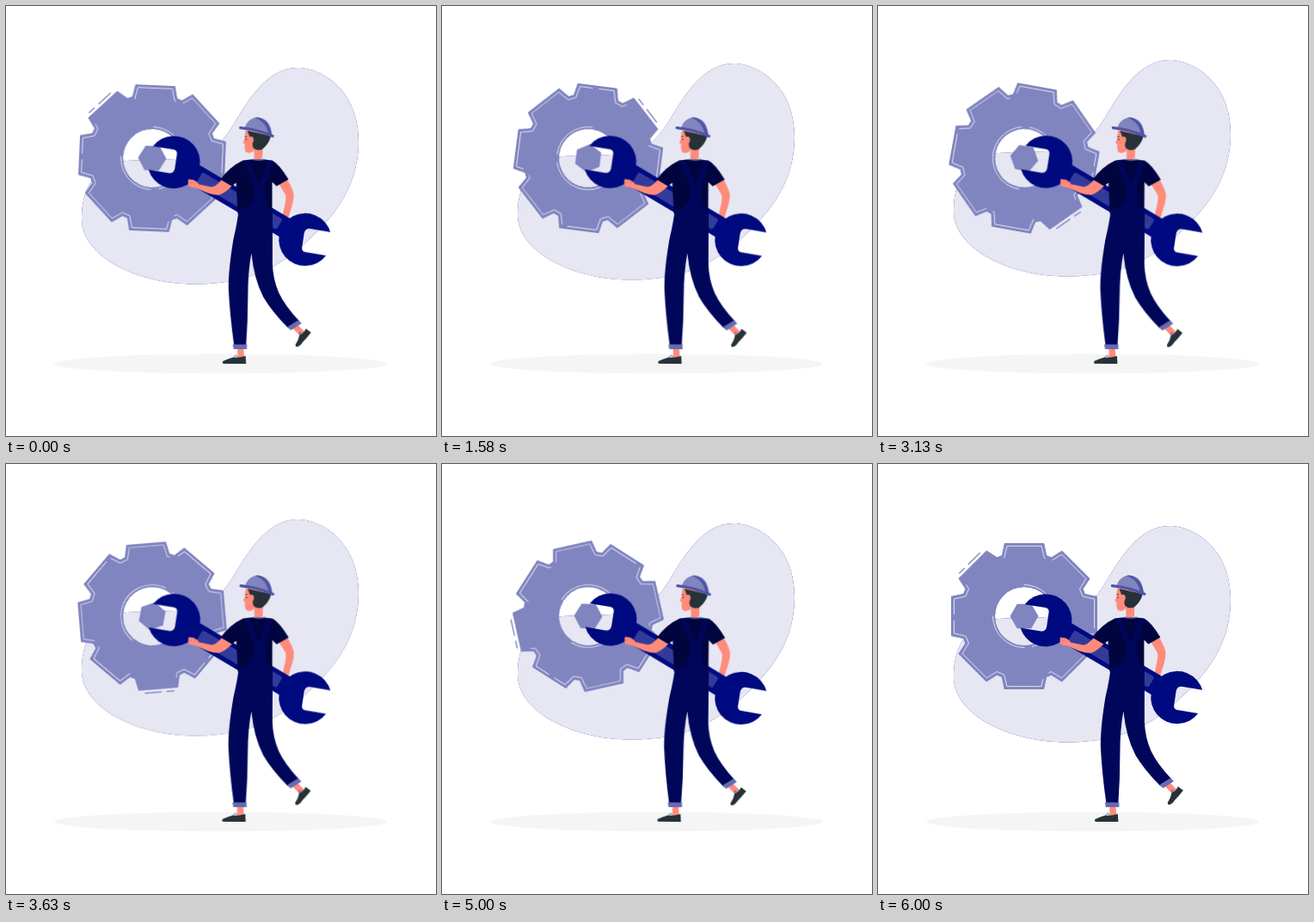
An HTML page that plays this animation: 500x500 px, repeating every 6040 ms.

```html
<!DOCTYPE html>
<html lang="en">
<head>
<meta charset="utf-8">
<title>Mechanic with wrench</title>
<style>
  html, body { margin: 0; width: 100%; height: 100%; overflow: hidden; background: #fff; }
  svg { display: block; width: 100%; height: 100%; }

  .blob, .gear, .worker { animation: 6.04s linear -40ms infinite; }
  .blob { animation-name: float; }
  .gear { animation-name: spin; transform-origin: 170px 177px; }
  .worker { animation-name: sway; animation-duration: 1.51s; transform-origin: 270px 273px; }

  /* One turn takes 6 s, then rests for 40 ms. */
  @keyframes spin { 99.34%, to { transform: rotate(360deg); } }
  @keyframes float {
    49.67% { transform: translateY(-9.7px); }
    99.34% { transform: none; }
  }
  @keyframes sway {
    25% { transform: rotate(1deg); }
    75% { transform: rotate(-1deg); }
  }

  .navy { fill: #000a80; }
  .denim { fill: #00075a; }
  .shirt { fill: #000540; }
  .skin { fill: #ff8b7b; }
  .dark { fill: #263238; }
  .cuff { fill: #666cb3; }
  .line { fill: none; stroke: #fff; stroke-width: 1; stroke-opacity: .75; stroke-linecap: round; }
</style>
</head>
<body>
<svg viewBox="0 0 500 500">
  <defs>
    <path id="blobShape" d="M339 72C368 72 410 99 410 157C410 200 392 233 360 264C327 298 290 323.500 220 323.500C150 323.500 88 290 88 248C88 205 110 183 140 180C165 178 190 180 215 176C240 171 250 160 262 142C280 113 302 72 339 72Z"/>
    <path id="gearShape" fill-rule="evenodd"/>
    <path id="jaw" d="M105 37L81 33Q76 32.500 74.500 38L72 55Q71.500 59.500 76 60.300L100 64.200A30.600 30.600 0 1 1 105 37Z"/>
  </defs>

  <ellipse cx="249.500" cy="416" rx="193.500" ry="11.300" fill="#f5f5f5"/>

  <g class="blob">
    <use href="#blobShape" class="navy"/>
    <use href="#blobShape" fill="#fff" opacity=".9"/>
  </g>

  <g class="gear">
    <g transform="translate(170 177)">
      <use href="#gearShape" class="navy"/>
      <use href="#gearShape" fill="#fff" opacity=".5"/>
      <path id="rim" class="line" pathLength="8" stroke-dasharray=".9 .12 1.6 .1 1.2 .15 2.3 .1 .6 .93"/>
      <path class="line" d="M0-36.500A36.500 36.500 0 0 1 9.400 35.300M0 36.500A36.500 36.500 0 0 1-36.500 0"/>
      <path d="M-18-88.600h8M-3-88.600h18.500" transform="rotate(-45)" stroke="#8085bf" stroke-width="1.400" stroke-linecap="round"/>
      <path id="bolt" fill="#8085bf"/>
    </g>
  </g>

  <g class="worker">
    <g transform="translate(.4 -.4)">
      <!-- far arm -->
      <path class="skin" d="M316 206L325 200Q332 210 334 219Q334.500 226 331 236L328 246L321 245L323 235Q325.500 226 324.500 220Z"/>

      <!-- wrench -->
      <g class="navy" transform="translate(271 227)">
        <rect x="-78" y="-12.300" width="156" height="24.600" transform="rotate(30.400)"/>
        <use href="#jaw" x=".8" y="-.8"/>
        <use href="#jaw" x=".8" y="-.8" transform="rotate(180)"/>
        <rect x="-54" y="-7" width="108" height="14" rx="2.500" transform="rotate(30.400)" fill="#fff" fill-opacity=".2"/>
      </g>

      <!-- feet -->
      <path class="skin" d="M269 398H276L277 409H269ZM333 375L339 371L347 379L342 384Z"/>
      <path class="dark" d="M252 413.500Q258 410.500 264 409Q271 409.500 278.500 407.500L279 416.400H252.500Q251 415.500 252 413.500ZM336.500 394Q340 389 341 383Q346 381 348.500 375.500L354.500 380Q349 387 345 391Q341 397 337.500 396.500Q336 396 336.500 394Z"/>
      <path d="M264 409l3-2.500 2 2.500M341 383l0-3.500 3 1.500" fill="none" stroke="#666cb3"/>

      <!-- shirt and overalls -->
      <path class="shirt" d="M275 180Q292 177 309 180Q317 184 328 202L314 210L309 205V242H269Q268 222 267 206L262 210L249 202Q260 187 275 180Z"/>
      <path class="denim" d="M270 238Q283 237 286.500 226Q289 217 287.500 209L276 181L281.500 179.500L294 209L303 179.500L309 181.500L301 208Q299 220 303 231Q305 236 309.500 238V300Q310 318 317 334Q324 349 341 367L328 375Q309 356 299 339Q288 318 285 288Q281 308 281 338Q281 367 279 395H265Q260 360 258.500 330Q258 308 264 272Q269 250 270 238Z"/>
      <path d="M285 288Q286 278 289 269" fill="none" stroke="#000540" stroke-width=".8"/>
      <path class="cuff" d="M263.500 394H280V399.300H264.500ZM327 373.500L340 365.500L343.500 369.500L331 377.500Z"/>

      <!-- near arm -->
      <path class="skin" d="M250 203L262 210Q254 218 248 220Q243 221 234 218L220 212L212 210.500Q210.500 206 211.500 202L218 203Q222 205 224 208L238 211Q243 211 250 203Z"/>
      <path d="M212 206h4M218 203l1 4" fill="none" stroke="#e56f62" stroke-width=".7"/>

      <!-- head -->
      <path class="skin" d="M288 164L298 166L297.500 177.500Q293 180 288 178Z"/>
      <path d="M286.500 178.600Q293 180 300.500 178.600" fill="none" stroke="#666cb3" stroke-width="1.500"/>
      <path class="skin" d="M278 145Q276.500 151 277 154.500L274.800 159.500L277 161Q276.500 168 278.500 170.500Q283 173 289 168L298 161L296 147Z"/>
      <path class="dark" d="M280 145.500L307.500 151.500Q305 161 297.500 167Q291 169.500 287 165.500Q285 162 287 157L283 153Z"/>
      <ellipse class="skin" cx="284.500" cy="156" rx="2.800" ry="3.800"/>
      <ellipse class="dark" cx="278.700" cy="155.500" rx=".6" ry="1.100"/>
      <path d="M277 152.800l2.500-1" stroke="#263238" stroke-width=".8"/>

      <!-- helmet -->
      <path fill="#8085bf" d="M276.500 143.500Q280 130.500 292 130Q307 131 308.500 150.500Z"/>
      <path fill="#4d54a6" d="M288 130.300Q292 129 297 131.300Q307 136 308.500 150.500L304.500 149.500Q302 134 288 130.300Z"/>
      <path d="M272 142Q290 143.500 309.500 151.600" fill="none" stroke="#4d54a6" stroke-width="3.200" stroke-linecap="round"/>
    </g>
  </g>
</svg>

<script>
  const rad = deg => deg * Math.PI / 180;
  const turn = ([x, y], deg) => {
    const c = Math.cos(rad(deg)), s = Math.sin(rad(deg));
    return [x * c - y * s, x * s + y * c].map(n => n.toFixed(2)).join(' ');
  };

  // Repeats a run of points evenly around the origin.
  const ring = (points, count) => 'M' + Array.from({ length: count }, (_, i) =>
    points.map(p => turn(p, i * 360 / count)).join('L')).join('L') + 'Z';

  // One tooth, from its left foot to its right foot.
  const tooth = (top, height, foot, depth) =>
    [[-foot, -depth], [-top, -height], [top, -height], [foot, -depth]];

  const draw = (id, d) => document.getElementById(id).setAttribute('d', d);

  const hole = 'M-34 0a34 34 0 1 0 68 0a34 34 0 1 0-68 0Z';
  draw('gearShape', ring(tooth(23, 85, 26, 70.8), 8) + hole);
  draw('rim', ring(tooth(20, 81.6, 23.2, 68), 8));
  draw('bolt', ring([[16.5, 0]], 6));
</script>
</body>
</html>
```
